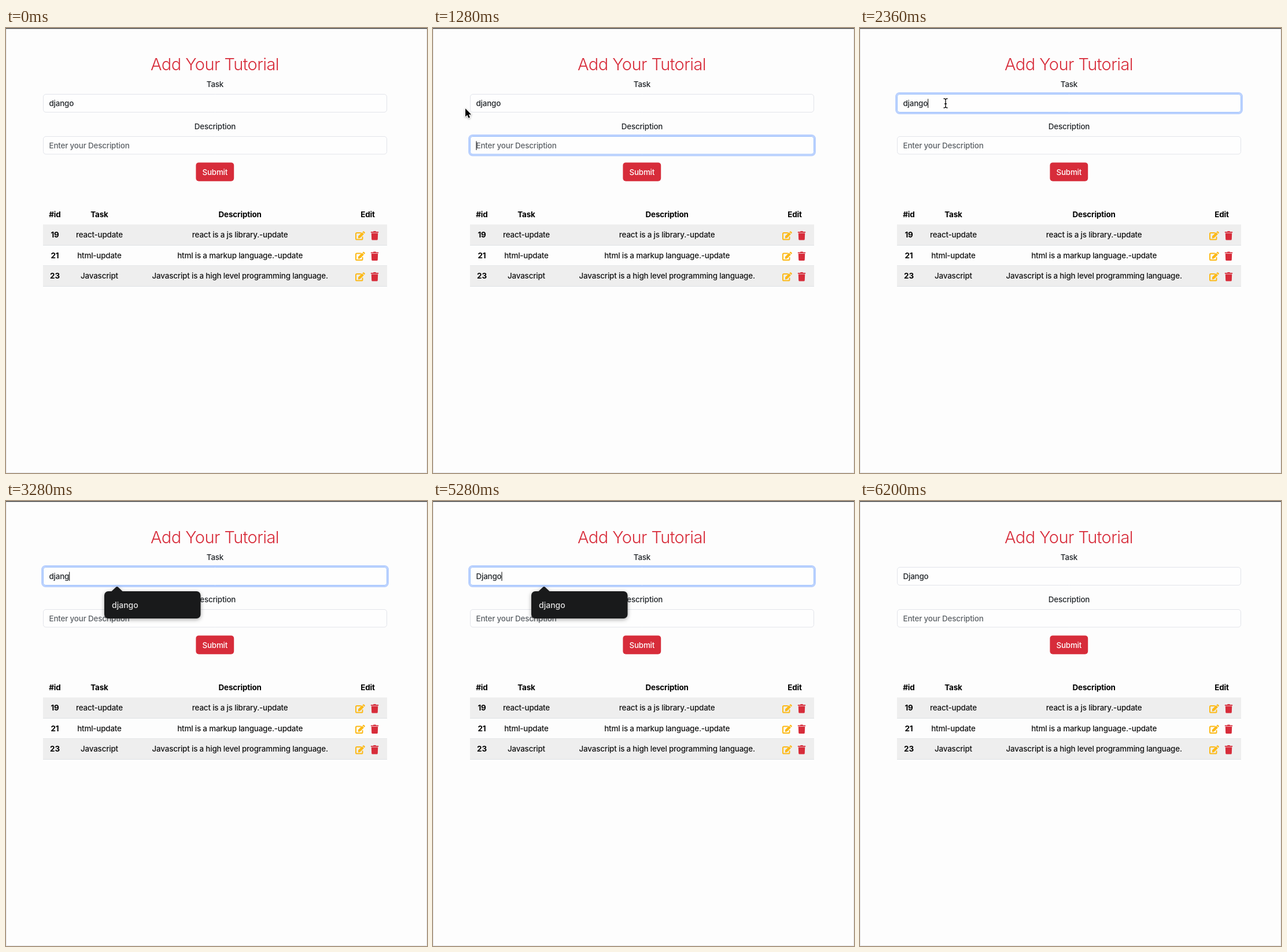
An HTML page with a canvas for the animation above (8 s loop, 728 by 769 pixels).

```html
<!DOCTYPE html>
<html lang="en">
<head>
<meta charset="utf-8">
<title>Add Your Tutorial</title>
<style>
html, body { margin: 0; width: 100%; height: 100%; overflow: hidden; background: #fdfdfd; }
canvas { display: block; width: 728px; height: 769px; }
</style>
</head>
<body>
<canvas id="stage" width="728" height="769"></canvas>
<script>
const ctx = document.getElementById('stage').getContext('2d');
const LOOP = 8000, BLINK = 480;
const RED = '#d72c3a', YELLOW = '#fcb917', INK = '#212529';
const FAMILY = 'Inter, "Open Sans", sans-serif';
const SIZE = 13.4, WEIGHT = 450, SPACING = -0.18;

const rows = [
  ['19', 'react-update', 'react is a js library.-update'],
  ['21', 'html-update', 'html is a markup language.-update'],
  ['23', 'Javascript', 'Javascript is a high level programming language.']
];
const columns = [84.5, 161.5, 404.7, 625.5];

// [time, value of the task field]
const edits = [
  [0, 'django'], [3000, 'djang'], [3400, 'djan'], [3480, 'dja'], [3560, 'dj'],
  [3640, 'd'], [3720, ''], [4960, 'D'], [5040, 'Dj'], [5120, 'Dja'],
  [5160, 'Djan'], [5200, 'Djang'], [5240, 'Django']
];
// [time, x, y] of the pointer
const path = [
  [40, 728, 757], [400, 480, 430], [720, 230, 222], [880, 150, 203], [1000, 140, 199],
  [1280, 56, 139], [1440, 50, 133], [1560, 50, 132], [1720, 72, 129], [1920, 125, 130],
  [2120, 148, 130], [2920, 148, 130]
];
const taskBox = { y: 114, h: 32 };
const descBox = { y: 187, h: 31.5 };

const clamp = v => Math.max(0, Math.min(1, v));
const mix = (a, b, k) => a + (b - a) * k;
const smooth = k => k * k * (3 - 2 * k);
// 1 between the two times, with soft edges
const during = (t, from, to, fade) => Math.min(clamp((t - from) / fade), 1 - clamp((t - to) / fade));

const penBox = new Path2D('M9.2 3H2.6Q1 3 1 4.6V12.9Q1 14.5 2.6 14.5H10.9Q12.5 14.5 12.5 12.9V10.2');
const pen = new Path2D('M5 8.8L11.7 2.1L14.9 5.3L8.2 12L4.7 12.4ZM12.5 1.4L13.4 .5Q14.3 -.2 15.1 .5L16.5 1.9Q17.2 2.7 16.5 3.6L15.6 4.5Z');
const trash = new Path2D('M.4 .9H4L4.6 0H8.4L9 .9H12.6Q13.2 .9 13.2 1.6V2.8H-.2V1.6Q-.2 .9 .4 .9ZM.8 3.5H12.2L11.8 14Q11.7 15.5 10.2 15.5H2.8Q1.3 15.5 1.2 14Z');
const arrow = new Path2D('M0 0V14.4L3.3 11.4L5.5 16.6L8 15.5L5.8 10.5H10.2Z');
const beam = new Path2D('M-3.5 -8Q0 -8 0 -6V6Q0 8 -3.5 8M3.5 -8Q0 -8 0 -6M0 6Q0 8 3.5 8M-2 1H2');

function setFont(size, weight, spacing) {
  ctx.font = `${weight} ${size}px ${FAMILY}`;
  ctx.letterSpacing = spacing + 'px';
}

function text(str, x, y, { color = INK, size = SIZE, weight = WEIGHT, spacing = SPACING, align = 'center' } = {}) {
  setFont(size, weight, spacing);
  ctx.fillStyle = color;
  ctx.textAlign = align;
  ctx.fillText(str, x, y);
}

function rounded(x, y, w, h, r) {
  ctx.beginPath();
  ctx.roundRect(x, y, w, h, r);
}

function at(x, y, draw) {
  ctx.save();
  ctx.translate(x, y);
  draw();
  ctx.restore();
}

function field(box, focus, value, hint) {
  if (focus > 0) {
    ctx.fillStyle = `rgba(13,95,253,${0.28 * focus})`;
    rounded(61, box.y - 3, 601, box.h + 6, 7.5);
    ctx.fill();
  }
  ctx.fillStyle = '#fefefe';
  rounded(64, box.y, 595, box.h, 5);
  ctx.fill();
  rounded(64.5, box.y + 0.5, 594, box.h - 1, 4.5);
  ctx.lineWidth = 1;
  ctx.strokeStyle = `rgb(${mix(226, 158, focus)},${mix(228, 194, focus)},${mix(234, 253, focus)})`;
  ctx.stroke();
  text(value || hint, 74.5, box.y + 21, { align: 'left', color: value ? INK : '#5c6166' });
}

function caret(t, start, box, value) {
  const phase = (t - start) % (2 * BLINK);
  if (phase >= BLINK) return;
  setFont(SIZE, WEIGHT, SPACING);
  const x = 74.5 + ctx.measureText(value).width;
  ctx.globalAlpha = t - start < BLINK ? 1 : clamp((phase + 40) / 160);
  ctx.fillStyle = '#000';
  ctx.fillRect(x, box.y + 8.5, 1, 15.5);
  ctx.globalAlpha = 1;
}

function page() {
  ctx.fillStyle = '#fdfdfd';
  ctx.fillRect(0, 0, 728, 769);
  ctx.fillStyle = '#e6e6ea';
  ctx.fillRect(0, 0, 1, 769);
  ctx.fillRect(727, 0, 1, 769);
  ctx.fillRect(0, 768, 728, 1);
  ctx.fillStyle = '#3c3c3c';
  ctx.fillRect(0, 0, 728, 1.4);

  text('Add Your Tutorial', 361, 73, { color: RED, size: 29, weight: 340, spacing: -0.55 });
  text('Task', 361.5, 102);
  text('Description', 361.5, 175);

  ctx.fillStyle = RED;
  rounded(328.4, 232.4, 65.8, 32.4, 5);
  ctx.fill();
  text('Submit', 361.3, 253.5, { color: '#fff' });
}

function table() {
  const bold = { color: '#000', weight: 700, spacing: -0.13 };
  ['#id', 'Task', 'Description', 'Edit'].forEach((s, i) => text(s, columns[i], 327, bold));
  rows.forEach((row, i) => {
    const y = 339.5 + i * 35.5;
    if (i % 2 === 0) {
      ctx.fillStyle = '#eeeeee';
      ctx.fillRect(64, y, 595, 35.5);
    }
    ctx.fillStyle = '#dfe2e5';
    ctx.fillRect(64, Math.round(y + 35), 595, 1);
    row.forEach((s, j) => text(s, columns[j], y + 22.5, j ? { color: '#111' } : bold));
    at(604, y + 11.5, () => {
      ctx.strokeStyle = ctx.fillStyle = YELLOW;
      ctx.lineWidth = 2;
      ctx.lineCap = 'round';
      ctx.stroke(penBox);
      ctx.fill(pen);
    });
    at(631, y + 11.5, () => {
      ctx.fillStyle = RED;
      ctx.fill(trash);
    });
  });
}

function popup(alpha) {
  if (alpha <= 0) return;
  ctx.save();
  ctx.globalAlpha = alpha;
  ctx.shadowColor = 'rgba(0,0,0,.35)';
  ctx.shadowBlur = 7;
  ctx.shadowOffsetY = 2;
  ctx.fillStyle = '#191a1b';
  rounded(170, 156, 166.5, 47, 7);
  ctx.moveTo(182, 156.5);
  ctx.lineTo(190, 149);
  ctx.quadraticCurveTo(192, 147.2, 194, 149);
  ctx.lineTo(202, 156.5);
  ctx.closePath();
  ctx.fill();
  ctx.shadowColor = 'transparent';
  text('django', 183, 185, { color: '#e4e4e4', size: 14, spacing: 0, align: 'left' });
  ctx.restore();
}

function pointer(t) {
  const next = path.findIndex(p => p[0] > t);
  if (next < 1) return;
  const [t0, x0, y0] = path[next - 1], [t1, x1, y1] = path[next];
  const k = (t - t0) / (t1 - t0);
  const e = next === path.length - 2 ? smooth(k) : k;
  const x = mix(x0, x1, e), y = mix(y0, y1, e);
  const inside = x > 64 && x < 659 && [taskBox, descBox].some(b => y > b.y && y < b.y + b.h);
  at(x, y, () => {
    ctx.lineJoin = 'round';
    ctx.strokeStyle = '#fff';
    if (inside) {
      ctx.lineWidth = 3;
      ctx.stroke(beam);
      ctx.lineWidth = 1.4;
      ctx.strokeStyle = '#111';
      ctx.stroke(beam);
      return;
    }
    ctx.shadowColor = 'rgba(0,0,0,.35)';
    ctx.shadowBlur = 3;
    ctx.shadowOffsetY = 1;
    ctx.lineWidth = 2;
    ctx.stroke(arrow);
    ctx.shadowColor = 'transparent';
    ctx.fillStyle = '#000';
    ctx.fill(arrow);
  });
}

function draw(t) {
  const [editTime, value] = edits.filter(e => e[0] <= t).pop();
  page();
  field(taskBox, during(t, 1920, 6000, 150), value, 'Enter your title');
  field(descBox, during(t, 880, 1920, 150), '', 'Enter your Description');
  if (t >= 880 && t < 1920) caret(t, 880, descBox, '');
  if (t >= 1920 && t < 6000) caret(t, Math.max(1920, editTime), taskBox, value);
  table();
  popup(Math.max(during(t, 3000, 3740, 100), during(t, 4980, 5800, 100)));
  pointer(t);
}

function frame() {
  draw(performance.now() % LOOP);
  requestAnimationFrame(frame);
}
frame();
</script>
</body>
</html>
```
